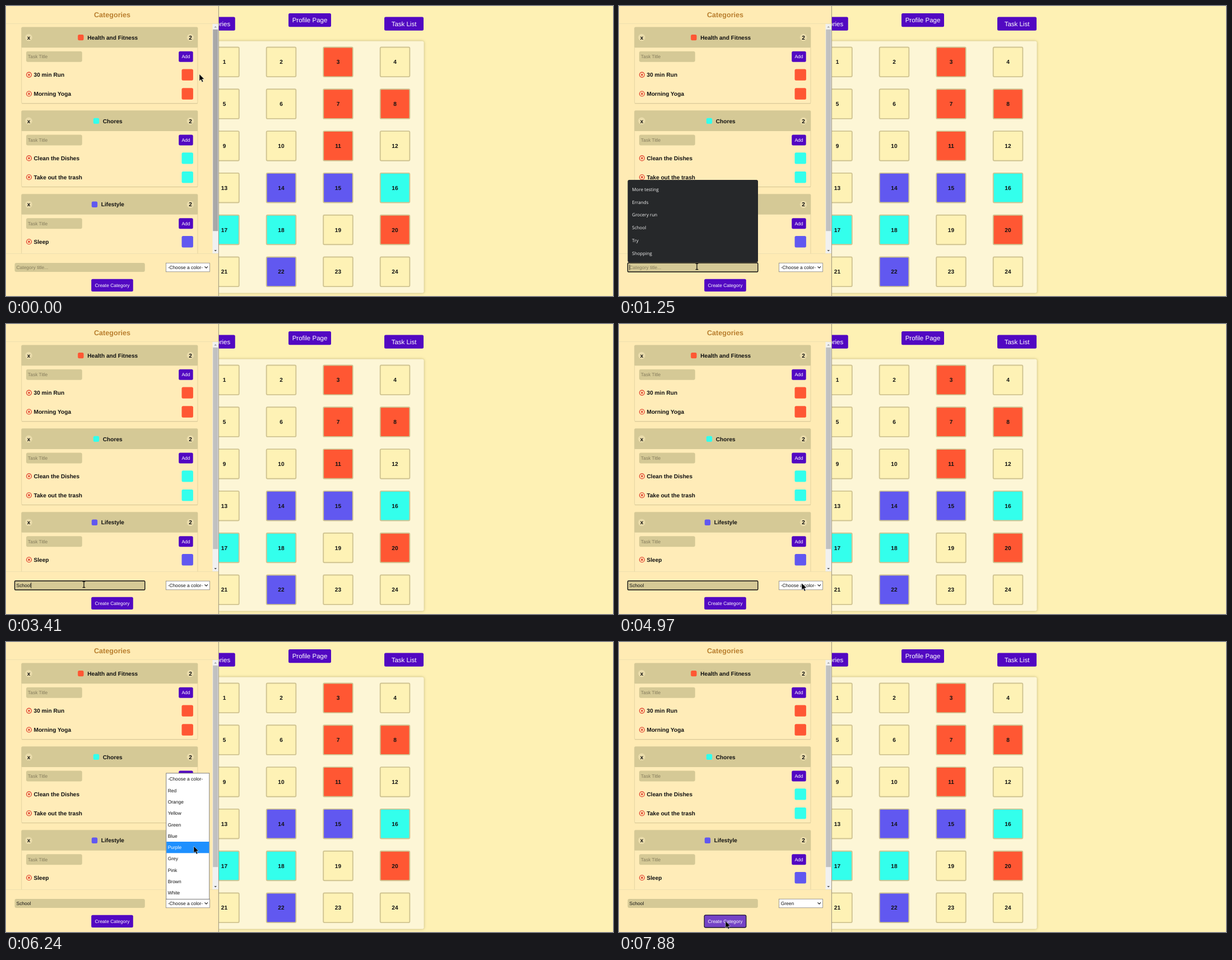
These frames come from a looping animation (1083 px wide and 517 px high, 8000 ms). An HTML page:

```html
<!DOCTYPE html>
<html lang="en">
<head>
<meta charset="utf-8">
<title>Categories</title>
<style>
  html, body { margin: 0; width: 100%; height: 100%; overflow: hidden; background: #fef1b4; }
  svg { display: block; width: 100vw; height: 100vh; }
  text { font-family: "Liberation Sans", Arial, sans-serif; text-rendering: geometricPrecision; white-space: pre; }
  .suggest text { font-family: "Open Sans", "Noto Sans", sans-serif; font-weight: 500; }
</style>
</head>
<body>
<svg id="stage" viewBox="0 0 1083 517" xmlns="http://www.w3.org/2000/svg"></svg>
<script>
const LOOP = 8000;
const TAN = '#d5c996', PURPLE = '#5208c2';
const ORANGE = '#ff5733', CYAN = '#33ffec', BLUE = '#6158f0';
const SMALL = 8.46, BODY = 10.15, NAV = 11.5;
const COLORS = ['-Choose a color-', 'Red', 'Orange', 'Yellow', 'Green', 'Blue',
  'Purple', 'Grey', 'Pink', 'Brown', 'White'];
const LIST_TOP = 234.2, LIST_ROW = 20.3;

const rect = (x, y, w, h, fill, rx = 0, extra = '') =>
  `<rect x="${x}" y="${y}" width="${w}" height="${h}" rx="${rx}" fill="${fill}" ${extra}/>`;

// Text is centred vertically on cy.
const label = (x, cy, str, size, fill = '#111', extra = '') =>
  `<text x="${x}" y="${cy + size * 0.36}" font-size="${size}" fill="${fill}" ${extra}>${str}</text>`;
const MID = 'text-anchor="middle"', BOLD = 'font-weight="700"';

const button = (x, y, w, h, str, size) =>
  rect(x, y, w, h, PURPLE, 2.5) + label(x + w / 2, y + h / 2, str, size, '#fff', MID);

function board() {
  const hues = { 3: ORANGE, 7: ORANGE, 8: ORANGE, 11: ORANGE, 20: ORANGE,
    14: BLUE, 15: BLUE, 22: BLUE, 16: CYAN, 17: CYAN, 18: CYAN };
  let out = rect(338, 62.8, 407.5, 448.7, '#fdf6d6', 3, 'filter="url(#soft)"');
  for (let i = 0; i < 24; i++) {
    const cx = 389.5 + (i % 4) * 101.5, cy = 99.8 + Math.floor(i / 4) * 74.8;
    out += rect(cx - 26.3, cy - 26.3, 52.6, 52.6, hues[i + 1] || '#fef2b5', 2,
      'stroke="#d0c491" stroke-width="1.9"');
    out += label(cx, cy, i + 1, BODY, '#111', MID + BOLD);
  }
  return out;
}

function card(y, title, hue, swatchX, tasks) {
  const cy = y + 18.3;
  const badge = (x, s) => `<circle cx="${x}" cy="${cy}" r="6.3" fill="#eadcab"/>` +
    label(x, cy, s, BODY, '#111', MID + BOLD);
  let out = rect(27.7, y, 314.2, 135.8, '#ffecb8', 2, 'stroke="#d8cb99" stroke-width=".7"') +
    rect(27.5, y, 314.6, 36.4, TAN, 1.5) +
    `<path d="M28 ${y + 136}H342" stroke="#cfc291" stroke-width=".7"/>` +
    badge(40.5, 'x') + badge(329, '2') +
    rect(swatchX, cy - 5.2, 10.4, 10.4, hue, 2.5) +
    label(swatchX + 17, cy, title, BODY, '#111', BOLD) +
    rect(36, y + 42.9, 99.8, 19, TAN, 3) +
    label(39, y + 52.4, 'Task Title', SMALL, '#857c5c') +
    button(308.2, y + 42.9, 25.5, 19, 'Add', SMALL);
  tasks.forEach((task, i) => {
    const ty = y + 84.8 + i * 33.9;
    out += `<g stroke="#dd2a1b" stroke-width="1.1" fill="none"><circle cx="41" cy="${ty}" r="4.5"/>` +
      `<path d="M39.2 ${ty - 1.8}l3.6 3.6m0 -3.6l-3.6 3.6"/></g>` +
      label(49.5, ty, task, BODY, '#111', BOLD) +
      rect(313.5, ty - 10.2, 20.4, 20.4, hue, 2.5);
  });
  return out;
}

function sidebar() {
  return rect(0, 0, 379.5, 517, '#ffebb4') +
    '<g clip-path="url(#scroll)">' +
    card(37.8, 'Health and Fitness', ORANGE, 128.2, ['30 min Run', 'Morning Yoga']) +
    card(186.6, 'Chores', CYAN, 155.8, ['Clean the Dishes', 'Take out the trash']) +
    card(335.4, 'Lifestyle', BLUE, 152.8, ['Sleep', 'Read']) + '</g>' +
    '<path d="M0 31.5H379M0 441.5H379" stroke="#eadcae" stroke-width=".8"/>' +
    label(189.5, 15.2, 'Categories', 12.6, '#b97f2f', MID + BOLD) +
    rect(368.5, 32, 10.5, 409, '#f1f1f1') +
    rect(369.2, 41.8, 9, 359.4, '#c1c1c1', 0, 'id="thumb"') +
    '<path d="M371.4 38.4h4.6l-2.3-2.6z" fill="#a3a3a3"/>' +
    '<path d="M371.4 435h4.6l-2.3 2.6z" fill="#505050"/>' +
    '<path d="M379.4 0V517" stroke="#8f8a76" stroke-width=".9"/>';
}

function form() {
  return rect(15.5, 458, 232.3, 16, TAN, 3, 'id="field"') +
    label(18.5, 466, '', SMALL, '#111', 'id="typed"') +
    rect(18.5, 461, 0.8, 10, '#111', 0, 'id="caret"') +
    rect(285.6, 458.2, 77.8, 15.6, '#fff', 0, 'stroke="#767676" stroke-width=".7"') +
    label(288.7, 466, '', SMALL, '#111', 'id="choice"') +
    '<path d="M354.5 464.4l2.7 2.7 2.7-2.7" fill="none" stroke="#222" stroke-width="1.2"/>' +
    rect(152.2, 486.8, 74.6, 22.2, PURPLE, 2.5, 'id="create"') +
    label(189.5, 498, 'Create Category', SMALL, '#fff', MID);
}

const stage = document.getElementById('stage');
stage.innerHTML = `<defs>
  <clipPath id="scroll"><rect y="32" width="369" height="409.5"/></clipPath>
  <filter id="soft" x="-5%" y="-5%" width="110%" height="110%">
    <feDropShadow dx="0" dy="0" stdDeviation="2.2" flood-color="#6b5f2a" flood-opacity=".5"/></filter>
  </defs>` +
  rect(0, 0, 1083, 517, '#fef1b4') + board() +
  button(336, 19.5, 72.8, 24.2, 'Categories', NAV) +
  button(504, 13, 76, 24.3, 'Profile Page', NAV) +
  button(675, 19.5, 70, 24.2, 'Task List', NAV) +
  sidebar() + form() +
  `<g id="suggest" class="suggest"></g><g id="list"></g>
  <path id="arrow" d="M0 0V12.2L2.8 9.6L4.8 14.2L6.9 13.3L4.9 8.8H8.7Z" fill="#000" stroke="#fff" stroke-width=".5"/>
  <path id="beam" d="M-2.3 -5.2H-.6L0 -4.7L.6 -5.2H2.3M-2.3 5.2H-.6L0 4.7L.6 5.2H2.3M0 -4.7V4.7" fill="none" stroke="#000" stroke-width="1.2"/>`;

const el = id => document.getElementById(id);
const set = (id, attrs) => { for (const k in attrs) el(id).setAttribute(k, attrs[k]); };
const show = (id, on) => set(id, { visibility: on ? 'visible' : 'hidden' });
const setHTML = (id, html) => {
  const node = el(id);
  if (node.memo !== html) node.innerHTML = node.memo = html;
};

// Pointer moves: first step, last step, number of steps, end point, bend at mid-way.
const MOVES = [
  { a: 90, b: 190, n: 2, to: [227, 413] },
  { a: 380, b: 950, n: 7, to: [139, 464.5] },
  { a: 4100, b: 4200, n: 2, to: [171, 451] },
  { a: 4390, b: 4970, n: 7, to: [326, 462], bend: 21 },
  { a: 6060, b: 6240, n: 3, to: [335, 364] },
  { a: 6330, b: 6710, n: 5, to: [338, 330.5] },
  { a: 7210, b: 7880, n: 8, to: [190, 497.5] }
];

function pointer(t) {
  let pos = [345, 121.5];
  for (const { a, b, n, to, bend = 0 } of MOVES) {
    if (t < a) break;
    const step = Math.min(n, Math.floor((t - a) / ((b - a) / (n - 1)) + 1e-6) + 1);
    const p = step / n, e = p * p * (3 - 2 * p);
    pos = [pos[0] + (to[0] - pos[0]) * e,
      pos[1] + (to[1] - pos[1]) * e + bend * Math.sin(Math.PI * e)];
  }
  return pos;
}

const KEYS = [2340, 2540, 2830, 3030, 3230, 3410];
const HISTORY = ['More testing', 'Errands', 'Grocery run', 'School', 'Try', 'Shopping'];

function suggestions(t, typed) {
  if (t < 1250 || t >= 3410) return '';
  const items = HISTORY.filter(s => s.startsWith(typed));
  const h = items.length * 22.8 + 10.2;
  const top = items.length > 1 ? 457 - h : 475.2;
  return rect(15.5, top, 232.5, h, '#26282a', 3) + items.map((s, i) =>
    label(23.3, top + 16.8 + i * 22.8, s, 8.1, '#f2f2f2')).join('');
}

function colorList(t, y) {
  if (t < 5270 || t >= 7010) return '';
  const at = y < 458 ? Math.floor((y - LIST_TOP) / LIST_ROW) : 0;
  return rect(285.8, 233.9, 77, 224.6, '#fff', 0, 'stroke="#707070" stroke-width=".9"') +
    rect(286.3, LIST_TOP + at * LIST_ROW, 76, LIST_ROW, '#1e90ff') +
    COLORS.map((c, i) => label(288.7, LIST_TOP + (i + 0.5) * LIST_ROW, c, SMALL,
      i === at ? '#fff' : '#111')).join('');
}

function draw(t) {
  const [x, y] = pointer(t);
  const typed = 'School'.slice(0, KEYS.filter(k => t >= k).length);
  const focused = t >= 1250 && t < 5270;

  set('thumb', { fill: t < 90 ? '#a8a8a8' : '#c1c1c1' });
  set('field', focused
    ? { stroke: '#111', 'stroke-width': 1.4, rx: 1.5 }
    : { stroke: 'none', 'stroke-width': 0, rx: 3 });
  el('typed').textContent = typed || 'Category title...';
  set('typed', { fill: typed ? '#111' : '#857c5c' });

  const caretOn = (t >= 1250 && t < 1850) || (t >= 2340 && t < 3910) || (t >= 4390 && t < 4970);
  show('caret', caretOn);
  set('caret', { x: 18.6 + (typed ? el('typed').getComputedTextLength() : 0) });

  el('choice').textContent = t < 7010 ? COLORS[0] : 'Green';
  const hover = x > 152 && x < 227 && y > 487 && y < 509;
  const pressed = t >= 7880;
  set('create', { fill: hover ? '#7443c6' : PURPLE,
    stroke: pressed ? '#1c1233' : 'none', 'stroke-width': pressed ? 1.3 : 0 });

  setHTML('suggest', suggestions(t, typed));
  setHTML('list', colorList(t, y));

  const overField = x > 15.5 && x < 247.8 && y > 458 && y < 474;
  show('beam', overField);
  show('arrow', !overField);
  set(overField ? 'beam' : 'arrow', { transform: `translate(${x} ${y})` });
}

function tick() {
  draw(performance.now() % LOOP);
  requestAnimationFrame(tick);
}
tick();
</script>
</body>
</html>
```
